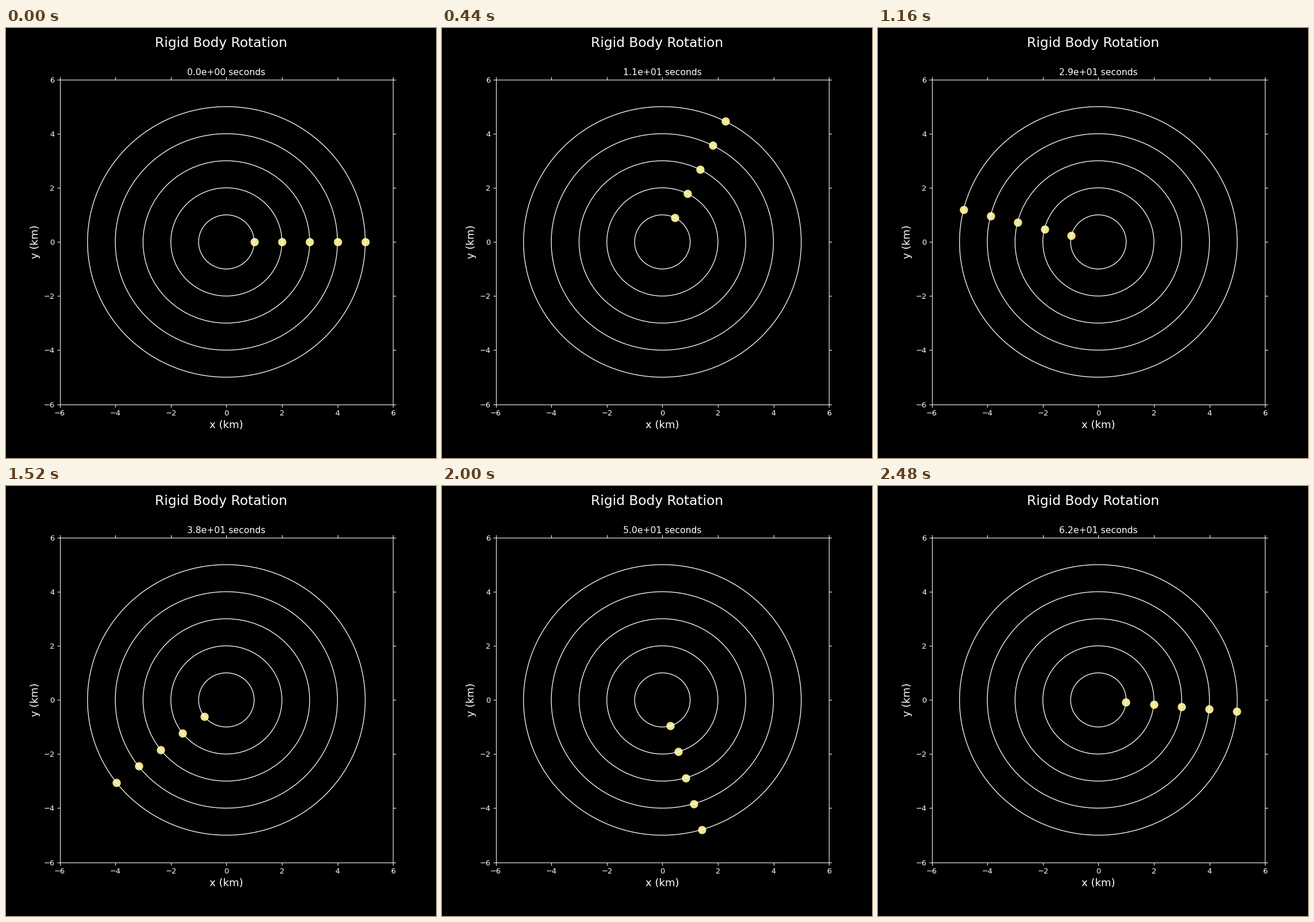
Write a matplotlib script that moves like this. It is 748 by 748 pixels and loops after 2.52 s.

```python
import numpy as np
import matplotlib.pyplot as plt
from matplotlib.animation import FuncAnimation
from matplotlib.patches import Circle

FRAMES = 63
INTERVAL = 40   # ms
OMEGA = 0.1     # rad per second, the same at every radius
RADII = np.arange(1, 6)

plt.style.use("dark_background")
plt.rcParams["font.family"] = "DejaVu Sans"

fig, ax = plt.subplots(figsize=(8, 8), dpi=93.5)
fig.subplots_adjust(left=0.125, right=0.9, bottom=0.125, top=0.88)
fig.suptitle("Rigid Body Rotation", fontsize=18)

ax.set_xlim(-6, 6)
ax.set_ylim(-6, 6)
ax.set_xlabel("x (km)", fontsize=14)
ax.set_ylabel("y (km)", fontsize=14)
ax.tick_params(top=True, right=True)
title = ax.set_title("", fontsize=12, y=1.0, pad=6)

# Orbits are drawn over the bodies
for r in RADII:
    ax.add_patch(Circle((0, 0), r, fill=False, edgecolor="white",
                        linewidth=1, zorder=2))
bodies = ax.scatter(RADII, 0 * RADII, s=100, color="khaki", zorder=1)


def update(second):
    angle = OMEGA * second
    bodies.set_offsets(np.outer(RADII, [np.cos(angle), np.sin(angle)]))
    title.set_text(f"{second:.1e} seconds")
    return bodies, title


anim = FuncAnimation(fig, update, frames=FRAMES, interval=INTERVAL,
                     init_func=lambda: update(0), repeat=True, repeat_delay=0)
plt.show()
```
